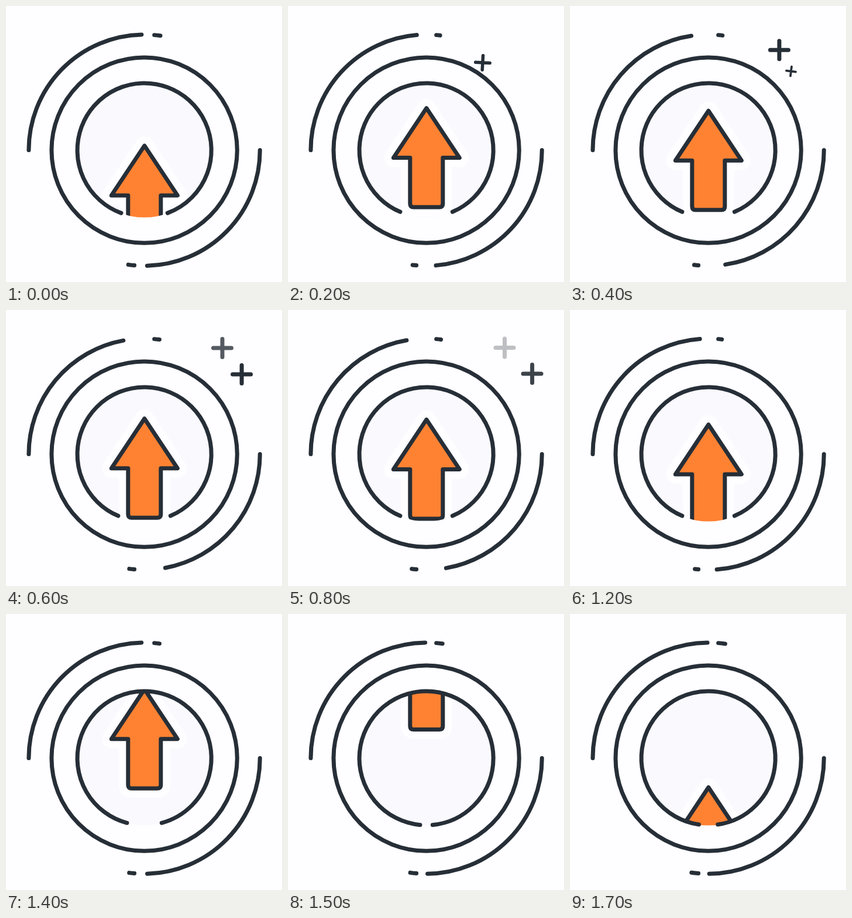
Write an HTML page with a canvas that moves like this. It is 472 px wide and 472 px high and loops after 1800 ms.

```html
<!DOCTYPE html>
<html lang="en">
<head>
<meta charset="utf-8">
<title>Arrow in rings</title>
<style>
  html, body { margin: 0; width: 100%; height: 100%; overflow: hidden; background: #fefdff; }
  canvas { display: block; width: 472px; height: 472px; }
</style>
</head>
<body>
<canvas id="stage" width="472" height="472"></canvas>
<script>
const ctx = document.getElementById('stage').getContext('2d');
const LOOP = 1800, STEP = 100;
const CENTER = 236.6, CENTER_Y = 246.6;
const INNER = 114.6, MIDDLE = 158.7, OUTER = 197.7;
const DARK = '#262e37', ORANGE = '#ff8232', PAPER = '#fefdff', DISK = '#faf9fd';

const easeIn = p => 1 - Math.cos(p * Math.PI / 2);
const easeOut = p => Math.sin(p * Math.PI / 2);
const easeInOut = p => (1 - Math.cos(p * Math.PI)) / 2;
const clamp = p => Math.max(0, Math.min(1, p));
const mix = (a, b, p) => a + (b - a) * p;
const rad = deg => deg * Math.PI / 180;

// Poses are [ms, value, easing into it]; the first may lie before the loop starts
const arrowTip = [[-200, 362], [245, 172, easeOut], [740, 187, easeOut], [1240, 197, easeIn], [1600, -96, easeIn]];
const ringGap = [[60, 23], [1260, 23], [1600, 1], [1860, 23]];
const arcGap = [[-180, 0.2], [640, 10.5], [1620, 0.2]];
const dashEnd = [[-130, 8.4], [250, 6.75], [620, 7.5], [1120, 6.6], [1670, 8.4]];

const pluses = [
  { birth: 50, from: [309.6, 117], to: [370.5, 64.5] },
  { birth: 300, from: [363.5, 112.5], to: [419.5, 109] }
];

function tween(poses, t) {
  if (t > poses[poses.length - 1][0]) t -= LOOP;
  if (t < poses[0][0]) t += LOOP;
  const i = poses.findIndex((pose, n) => n > 0 && pose[0] >= t);
  const [start, a] = poses[i - 1], [end, b, ease = easeInOut] = poses[i];
  return mix(a, b, ease((t - start) / (end - start)));
}

// Angles are in degrees, clockwise from the top
function arc(radius, from, to) {
  ctx.beginPath();
  ctx.arc(CENTER, CENTER_Y, radius, rad(from - 90), rad(to - 90));
  ctx.stroke();
}

function drawArrow(tip) {
  const arrow = new Path2D('M0 0L56.5 85H28V163.5q0 6-6 6H-22q-6 0-6-6V85H-56.5Z');
  ctx.save();
  ctx.beginPath();
  ctx.arc(CENTER, CENTER_Y, INNER + 0.4, 0, 2 * Math.PI);
  ctx.fillStyle = DISK;
  ctx.fill();
  ctx.clip();
  ctx.translate(CENTER + 0.2, tip + 0.2);
  ctx.lineWidth = 32;
  ctx.strokeStyle = PAPER;
  ctx.stroke(arrow);
  ctx.lineWidth = 7;
  ctx.strokeStyle = DARK;
  ctx.fillStyle = ORANGE;
  ctx.fill(arrow);
  ctx.stroke(arrow);
  ctx.restore();
}

// A plus pops out of the rings, glides to rest and fades
function drawPlus({ birth, from, to }, t) {
  const age = t - birth;
  const scale = clamp(age / 190), glide = easeOut(clamp(age / 600));
  if (!scale) return;
  ctx.save();
  ctx.globalAlpha = clamp((875 - age) / 417);
  ctx.translate(mix(from[0], to[0], glide), mix(from[1], to[1], glide));
  ctx.rotate(rad(15 * (1 - scale)));
  ctx.scale(scale, scale);
  ctx.stroke(new Path2D('M-15.5 0H15.5M0-15.5V15.5'));
  ctx.restore();
}

function draw(t) {
  ctx.fillStyle = PAPER;
  ctx.fillRect(0, 0, 472, 472);
  ctx.lineWidth = 7;
  ctx.lineCap = ctx.lineJoin = 'round';
  ctx.strokeStyle = DARK;

  drawArrow(tween(arrowTip, t));
  const gap = tween(ringGap, t);
  arc(INNER, gap - 180, 180 - gap);
  arc(MIDDLE, 0, 360);
  for (const turn of [0, 180]) {
    arc(OUTER, turn - 90, turn - tween(arcGap, t));
    arc(OUTER, turn + 4.95, turn + tween(dashEnd, t));
  }
  pluses.forEach(plus => drawPlus(plus, t));
}

function tick() {
  draw(Math.floor(performance.now() % LOOP / STEP) * STEP);
  requestAnimationFrame(tick);
}
tick();
</script>
</body>
</html>
```
